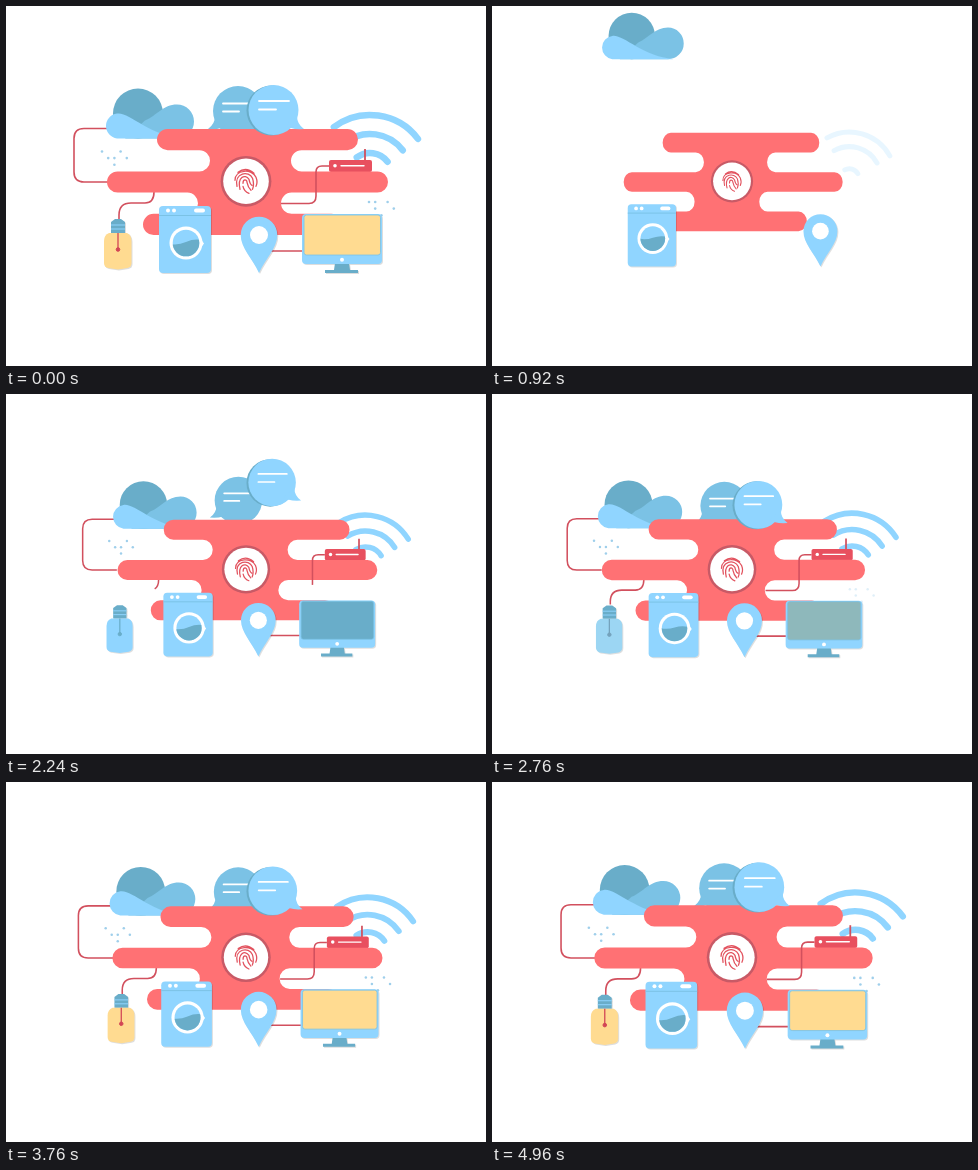
An HTML page for the animation above (5000 ms loop, 480 by 360 pixels).

```html
<!DOCTYPE html>
<html lang="en">
<head>
<meta charset="utf-8">
<title>Connected home</title>
<style>
html, body { margin: 0; width: 100%; height: 100%; overflow: hidden; background: #fff; }
svg { display: block; width: 100vw; height: 100vh; }
.light { fill: #90d5ff; }
.mid { fill: #7bc2e5; }
.dark { fill: #69adc9; }
.white { fill: #fff; }
.red { fill: #ff7174; }
.wire, .print { fill: none; stroke: #d2505e; stroke-width: 1.6; }
.wire { stroke-dasharray: 1 2; }
.print { stroke: #e2525e; stroke-width: 1.3; stroke-linecap: round; }
.text { fill: none; stroke: #fff; stroke-width: 1.8; stroke-linecap: round; }
.shade { filter: drop-shadow(1.5px 1px .6px #0002); }
</style>
</head>
<body>
<svg viewBox="0 0 480 360">
<defs><clipPath id="door"><circle cx="180" cy="237" r="13.3"/></clipPath></defs>
<g id="scene">
  <g id="wifi" fill="none" stroke="#90d5ff" stroke-width="6.5" stroke-linecap="round"></g>

  <path id="wireCloud" class="wire" pathLength="1" d="M104 122.500H78q-10 0-10 10v33.500q0 10 10 10H104"/>
  <path id="wireBulb" class="wire" pathLength="1" d="M148 186q0 11-9 11h-14q-12 0-12 12v6"/>
  <g id="dotsLeft" fill="#9fcfeb"></g>
  <g id="dotsRight" fill="#9fcfeb"></g>

  <g id="cloud">
    <circle class="dark" cx="133" cy="109" r="25"/>
    <path class="mid" d="M120 134L140 116C152 111 158 100 172 100a17 17 0 0 1 0 34z"/>
    <path class="light" d="M112 134a12.6 12.6 0 0 1 0-25c12-2 32 22 66 25z"/>
  </g>

  <g id="chatBack">
    <circle class="mid" cx="232" cy="105" r="25"/>
    <path class="mid" d="M209 110q0 8-7 13q14 1 18-4z"/>
    <path class="text" d="M217 97.500h27M217 105.500h16"/>
  </g>

  <g id="router">
    <path d="M359 143v12" stroke="#d2505e" stroke-width="1.8"/>
    <rect x="323" y="154" width="43" height="12" rx="2" fill="#e8505f"/>
    <circle class="white" cx="329" cy="159.700" r="1.800"/>
    <path class="text" style="stroke-width:1.4" d="M335 159.700h23"/>
  </g>

  <path id="blob" class="red"/>
  <g id="chatFront">
    <circle class="dark" cx="265.500" cy="104.500" r="25"/>
    <circle class="light" cx="267.500" cy="104" r="25"/>
    <path class="light" d="M291 110q0 8 7 13q-14 1-18-4z"/>
    <path class="text" d="M253 95h30M253 103.500h17"/>
  </g>
  <path id="wireRouter" class="wire" pathLength="1" d="M323 160h-7q-6 0-6 6v24q0 7.500-7 7.500h-28"/>

  <g id="badge">
    <circle r="25.400" fill="#c85a66"/>
    <circle r="22.800" class="white"/>
    <path class="print" d="M-8-9Q0-15 8-8M-11-1C-11-12 6-13 10-4q2 5 0 9M-9 5C-12-9 3-11 6.500-3q2 6 0 11M-6 8C-9-4-1-8 3-2q1 5 3 6M-3 2C-3-3 1-2 1 1q1 5 4 8M-3 5q1 5 6 7"/>
  </g>

  <g id="washer" class="shade">
    <rect class="light" x="153" y="200" width="52" height="67" rx="4"/>
    <path d="M153 209.500h52" stroke="#7bc2e5"/>
    <circle class="white" cx="162" cy="204.500" r="2"/>
    <circle class="white" cx="168" cy="204.500" r="2"/>
    <rect class="white" x="188" y="202.500" width="11" height="4" rx="2"/>
    <circle class="white" cx="180" cy="237" r="16.500"/>
    <path class="white" d="M194 232l4 5.500l-4 5.500z"/>
    <circle class="light" cx="180" cy="237" r="13.300"/>
    <g clip-path="url(#door)"><path id="water" class="dark" d="M160 236q10 4 20 0t20 0v22h-40z"/></g>
  </g>

  <path id="wirePin" class="wire" pathLength="1" d="M262 245H298"/>
  <g id="pin" class="shade">
    <path class="light" d="M253 267C246 252 234.700 242 234.700 229a18.300 18.300 0 0 1 36.600 0C271.300 242 260 252 253 267z"/>
    <circle class="white" cx="253" cy="229" r="9"/>
  </g>

  <g id="monitor" class="shade">
    <path class="dark" d="M329 257h14l1 7h8v3h-33v-3h9z"/>
    <rect class="light" x="296" y="208" width="80" height="50" rx="4"/>
    <rect x="298" y="209" width="76.500" height="40" rx="2.500" id="screen" stroke="#7bc2e5" stroke-width=".8"/>
    <circle class="white" cx="336" cy="253.700" r="2"/>
  </g>

  <g id="bulb" class="shade">
    <path class="dark" d="M109 213h6l4 3v11h-14v-11z"/>
    <path d="M105 219h14M105 223h14" stroke="#90d5ff"/>
    <path id="glass" d="M103 227h18q4.500 2 4.500 8v22q0 4-4 5l-9.500 1.500l-10-1.500q-4-1-4-5v-22q0-6 5-8z"/>
    <g id="filament"><path d="M112 227v16" stroke-width="1.300"/><circle cx="112" cy="243.500" r="1.800"/></g>
  </g>
</g>
</svg>
<script>
const $ = id => document.getElementById(id);
const LOOP = 5000, HOLD = 40, FINISH = 5330;
const clamp = v => Math.max(0, Math.min(1, v));
const part = (t, from, to) => clamp((t - from) / (to - from));
const remain = (t, from, to, power = 3) => (1 - part(t, from, to)) ** power;
const move = (id, x, y) => $(id).setAttribute('transform', `translate(${x} ${y})`);
const fade = (id, v) => $(id).setAttribute('opacity', v);
const draw = (id, p) => $(id).setAttribute('stroke-dashoffset', 1 - p);

function mix(a, b, p) {
  return `rgb(${a.map((v, i) => Math.round(v + (b[i] - v) * p))})`;
}

// Stacked bars joined in the middle, with rounded ends and notches
function blobPath() {
  const h = 21.2, r = h / 2;
  const right = [352, 285, 382, 275, 336], left = [137, 192, 101, 204, 151];
  const turn = (x, i, dir) => {
    const notch = i % 2;
    return `H${x + (notch ? r : -r) * dir}a${r} ${r} 0 0 ${notch ? 0 : 1} 0 ${h * dir}`;
  };
  return `M240 ${176 - 2.5 * h}` + right.map((x, i) => turn(x, i, 1)).join('') +
    left.map((x, i) => turn(x, i, -1)).join('') + 'z';
}

function arc(r) {
  const k = r * Math.SQRT1_2;
  return `<path d="M${-k} ${-k}A${r} ${r} 0 0 1 ${k} ${-k}"/>`;
}

function dots(id, x, y, rows) {
  $(id).innerHTML = rows.map((row, j) => [...row].map((c, i) =>
    c === 'o' ? `<circle cx="${x + i * 6.2}" cy="${y + j * 6.6}" r="1.3"/>` : '').join('')).join('');
}

$('blob').setAttribute('d', blobPath());
dots('dotsLeft', 96, 145.5, ['o..o.', '.oo.o', '..o..']);
dots('dotsRight', 363, 196, ['oo.o', '.o..o', '..o.']);

const BLUE = [144, 213, 255], TEAL = [105, 173, 201], YELLOW = [255, 219, 145], RED = [210, 70, 85];

function render(t) {
  const zoom = 1 - (FINISH - t) * 0.0000163;
  const drift = (t - 920) / (FINISH - 920);
  $('scene').setAttribute('transform', `translate(240 176) scale(${zoom}) translate(-240 -176)`);

  const sx = (0.962 + 0.038 * drift) * (1 - remain(t, 80, 1500, 2.3));
  const sy = 1 - remain(t, 80, 650);
  $('blob').setAttribute('transform', `translate(240 176) scale(${sx} ${sy}) translate(-240 -176)`);
  $('badge').setAttribute('transform', `translate(240 175.3) scale(${1 - remain(t, 500, 1300)})`);

  const inner = 22 * (0.4 + 0.6 * part(t, 700, 1500));
  $('wifi').innerHTML = [60, 41, inner].map(arc).join('');
  $('wifi').setAttribute('transform',
    `translate(${366.5 - 2.5 * drift} ${172 - 3 * drift}) rotate(${16 - 8 * drift}) scale(${0.83 + 0.17 * drift})`);
  fade('wifi', part(t, 620, 2100));

  const settle = 4 * part(FINISH - t, 0, 2100);
  move('washer', -270 * remain(t, 430, 1330), 0);
  move('pin', 309 * remain(t, 600, 1500), 0);
  move('cloud', -1, -1.5 - 239 * remain(t, 640, 1640));
  move('monitor', 230 * remain(t, 930, 1915), 0);
  move('bulb', -150 * remain(t, 1560, 2560), 0);
  move('chatBack', 0, settle - 180 * remain(t, 1500, 2600));
  move('chatFront', 0, settle - 250 * remain(t, 1700, 2700));
  move('router', 0, 22 * remain(t, 1330, 2030));
  fade('router', t < 1300 ? 0 : 1);

  draw('wireCloud', part(t, 1200, 1900));
  draw('wirePin', part(t, 1850, 2200));
  draw('wireRouter', part(t, 1900, 2550));
  draw('wireBulb', part(t, 2100, 2800));
  fade('dotsLeft', part(t, 1900, 2200));
  fade('dotsRight', part(t, 2600, 3100));

  const glow = part(t, 2700, 3260);
  $('screen').setAttribute('fill', mix(TEAL, YELLOW, part(t, 2650, 3100)));
  $('glass').setAttribute('fill', mix(BLUE, YELLOW, glow));
  const wire = mix(TEAL, RED, glow);
  $('filament').setAttribute('fill', wire);
  $('filament').setAttribute('stroke', wire);
  $('water').setAttribute('transform', `rotate(${-4 * Math.sin(t / 250)} 180 237)`);
}

function frame() {
  const t = performance.now() % LOOP;
  render(t < HOLD ? FINISH : t);
  requestAnimationFrame(frame);
}
frame();
</script>
</body>
</html>
```
